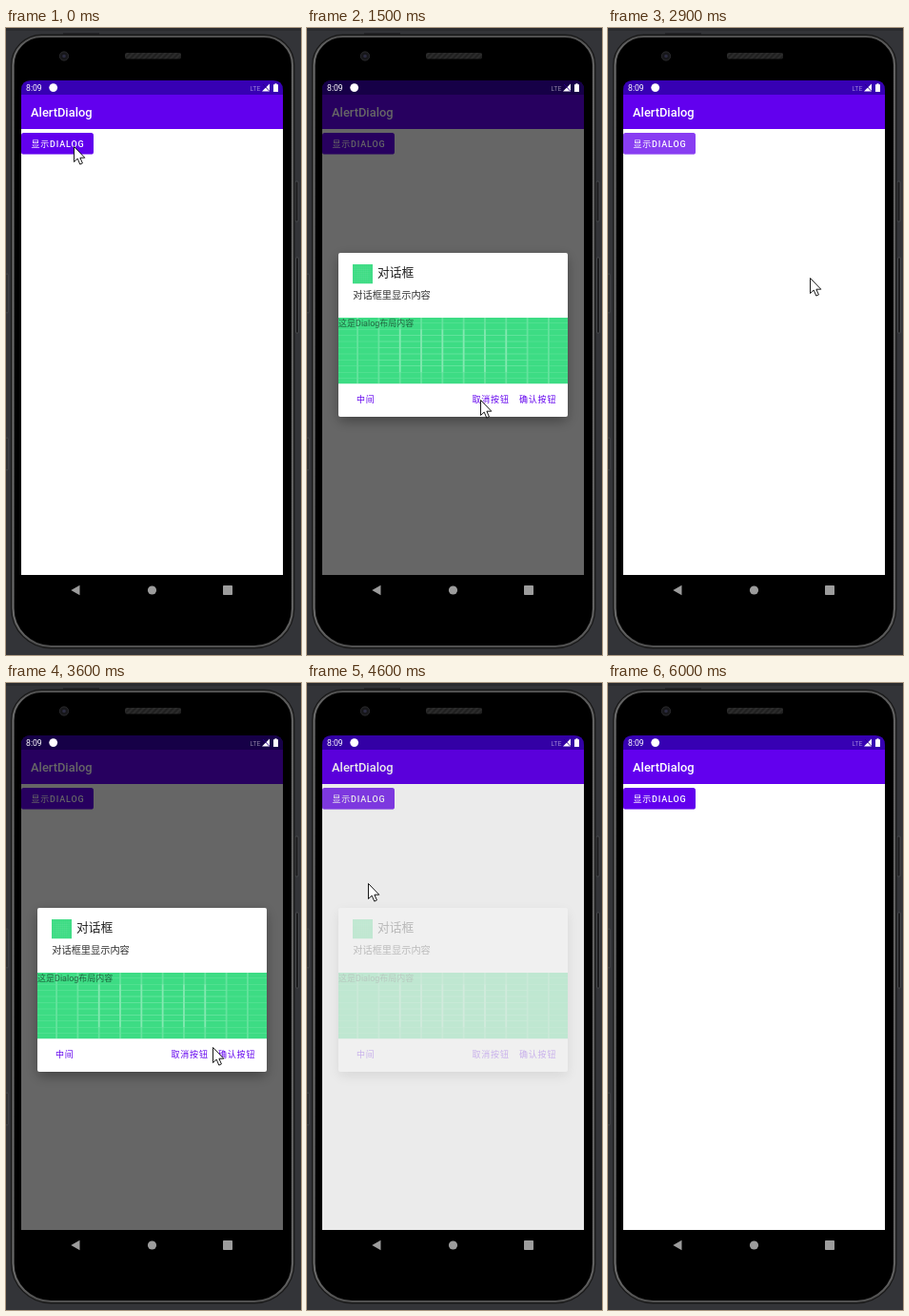
Animation of 310 by 658 pixels, one loop 6.1 s. Source, as an HTML page:

```html
<!DOCTYPE html>
<html lang="zh">
<head>
<meta charset="utf-8">
<title>AlertDialog</title>
<style>
html, body { margin: 0; width: 100%; height: 100%; overflow: hidden; background: #333438; }
svg { display: block; }
text { font-family: Roboto, "Noto Sans CJK SC", "Noto Sans CJK", sans-serif; }
.btn { font-size: 9px; font-weight: 500; letter-spacing: .8px; }
</style>
</head>
<body>
<svg id="stage" width="310" height="658" viewBox="0 0 310 658">
  <defs>
    <linearGradient id="rim" x1="0" x2="1" y1="0" y2="0">
      <stop offset="0" stop-color="#686868"/>
      <stop offset=".08" stop-color="#505050"/>
      <stop offset=".92" stop-color="#505050"/>
      <stop offset="1" stop-color="#606060"/>
    </linearGradient>
    <pattern id="mesh" width="4" height="4" patternUnits="userSpaceOnUse" patternTransform="rotate(45)">
      <rect width="4" height="4" fill="#202020"/>
      <rect width="2" height="4" fill="#2c2c2c"/>
    </pattern>
    <filter id="blur" x="-20%" y="-20%" width="140%" height="140%"><feGaussianBlur stdDeviation="6.500"/></filter>
    <clipPath id="screen"><path d="M16 574V65Q16 55 26 55H281Q291 55 291 65V574Z"/></clipPath>
    <path id="body" d="M7.500 39A30 30 0 0 1 37.500 9H271A30 30 0 0 1 301 39V609A40 40 0 0 1 261 649H47.500A40 40 0 0 1 7.500 609Z"/>
    <symbol id="grid" viewBox="0 0 108 108" preserveAspectRatio="none">
      <rect width="108" height="108" fill="#3ddc84"/>
      <path id="lines" fill="none" stroke="#fff" stroke-opacity=".2" stroke-width=".8"/>
    </symbol>
  </defs>

  <!-- phone body -->
  <rect width="310" height="658" fill="#333438"/>
  <rect width="310" height="3" fill="#2b2c2f"/>
  <rect x="60" y="5" width="38" height="2" fill="#222326"/>
  <g fill="#1c1c1e" stroke="#55565a" stroke-width=".7">
    <rect x="304" y="161" width="3" height="42" rx="1"/>
    <rect x="304.500" y="241" width="3" height="79" rx="1"/>
    <rect x="0" y="258" width="2" height="41" rx="1"/>
    <rect x="0" y="430" width="2" height="34" rx="1"/>
  </g>
  <use href="#body" fill="#000" stroke="#1a1a1a" stroke-width="5"/>
  <use href="#body" fill="#000" stroke="url(#rim)" stroke-width="2.200"/>
  <circle cx="61" cy="29.500" r="4.600" fill="#17171a" stroke="#2b2b2e"/>
  <circle cx="61" cy="29.500" r="1.800" fill="#2c2c40"/>
  <rect x="125" y="26" width="59" height="6.500" rx="2" fill="url(#mesh)"/>
  <g fill="#9c9c9c">
    <path d="M68.300 590L77.500 584.700V595.300Z"/>
    <circle cx="153.500" cy="590" r="4.600"/>
    <rect x="228" y="585" width="10" height="10" rx=".8"/>
  </g>

  <!-- app -->
  <g clip-path="url(#screen)">
    <rect x="16" y="106" width="276" height="469" fill="#fff"/>
    <rect x="16" y="54" width="276" height="16" fill="#3700b3"/>
    <rect x="16" y="70" width="276" height="36" fill="#6200ee"/>
    <text x="26" y="92.800" font-size="12.900" font-weight="500" fill="#fff">AlertDialog</text>
    <rect x="16" y="110" width="76" height="22.600" rx="2.700" fill="#6200ee"/>
    <rect id="ripple" x="16" y="110" width="76" height="22.600" rx="2.700" fill="#fff"/>
    <text class="btn" x="26.500" y="124.600" fill="#fff">显示DIALOG</text>
    <rect id="scrim" x="16" y="54" width="276" height="521"/>

    <g id="dialog">
      <rect x="34" y="241" width="239" height="171" fill-opacity=".36" filter="url(#blur)"/>
      <rect x="33" y="236" width="241" height="172" rx="2" fill="#fff"/>
      <use href="#grid" x="48" y="248" width="21" height="20.500"/>
      <text x="74" y="260.600" font-size="12.800" fill="#212121">对话框</text>
      <text x="48.300" y="283.700" font-size="10.200" fill="#2c2c2c">对话框里显示内容</text>
      <use href="#grid" x="33" y="304" width="241" height="69.500"/>
      <text x="33" y="313" font-size="9" fill-opacity=".54">这是Dialog布局内容</text>
      <g class="btn" fill="#6200ee">
        <text x="52" y="392.900">中间</text>
        <text x="173.500" y="392.900">取消按钮</text>
        <text x="223" y="392.900">确认按钮</text>
      </g>
    </g>
  </g>

  <!-- status icons -->
  <g fill="#fff">
    <text x="21" y="65.700" font-size="8.700">8:09</text>
    <circle cx="49.700" cy="62.600" r="4.400"/>
    <text x="256.500" y="65.500" font-size="7" font-weight="300" fill-opacity=".7">LTE</text>
    <path d="M269 66.500L277 58.500V66.500Z"/>
    <path d="M270 59L277 66.500" stroke="#2a0088" stroke-width=".9"/>
    <path d="M281 59.200H282.500V58.200H284.500V59.200H286V67H281Z"/>
  </g>

  <path id="cursor" d="M.5 .5V16.500L4.200 13.100L6.800 19.100L9.400 17.900L6.900 12.200H11.800Z" fill="#fff" stroke="#000" stroke-width=".9" stroke-linejoin="round"/>
</svg>
<script>
const LOOP = 6100, STEP = 100;
const $ = id => document.getElementById(id);
const clamp = v => Math.max(0, Math.min(1, v));
const ramp = (t, start, length) => clamp((t - start) / length);

const CLICKS = [100, 2600, 4300];
const SHOWS = [{ open: 360, close: 1760 }, { open: 2900, close: 3660 }, { open: 4567, close: 5260 }];
// time, x, y of the pointer tip
const PATH = [
  [0, 71, 124], [200, 71, 124], [700, 115, 230], [1200, 172, 370], [1500, 182, 390],
  [1700, 182, 390], [2000, 130, 260], [2400, 71, 122], [2600, 71, 122], [2900, 212, 262],
  [3100, 282, 335], [3200, 290, 350], [3400, 217, 382], [3700, 217, 382], [4000, 125, 210],
  [4200, 66, 122], [4400, 66, 122], [4600, 64, 210], [4900, 64, 388], [5300, 64, 388],
  [5500, 291, 345], [5600, 330, 335], [LOOP, 330, 335]
];

// Full grid plus a second, shorter set that brightens the middle
let lines = "";
for (let p = 9; p < 108; p += 10) lines += `M${p} 0V108M0 ${p}H108`;
$("lines").setAttribute("d", lines);
let inner = "";
for (let p = 29; p < 80; p += 10) inner += `M${p} 19V89M19 ${p}H89`;
const core = $("lines").cloneNode();
core.removeAttribute("id");
core.setAttribute("d", inner);
$("grid").append(core);

function pointer(t) {
  const i = PATH.findIndex(k => k[0] > t);
  const [t0, x0, y0] = PATH[i - 1], [t1, x1, y1] = PATH[i];
  const p = (t - t0) / (t1 - t0);
  return [x0 + (x1 - x0) * p, y0 + (y1 - y0) * p].map(Math.round);
}

function draw(t) {
  let ripple = 0, scrim = 0, dialog = 0;
  for (const c of CLICKS)
    ripple = Math.max(ripple, ramp(t, c, 150) * (1 - ramp(t, c + 350, 300)));
  for (const { open, close } of SHOWS) {
    const p = ramp(t, open, 250);
    scrim += p * (1 - ramp(t, close + 40, 220));
    dialog += (1 - (1 - p) ** 2) * (1 - ramp(t, close, 200));
  }
  $("ripple").setAttribute("opacity", ripple * .24);
  $("scrim").setAttribute("opacity", scrim * .6);
  $("dialog").setAttribute("opacity", dialog);
  $("cursor").setAttribute("transform", `translate(${pointer(t)})`);
}

const begin = performance.now();
function tick() {
  const t = (performance.now() - begin) % LOOP;
  draw(Math.floor(t / STEP) * STEP);
  requestAnimationFrame(tick);
}
tick();
</script>
</body>
</html>
```
